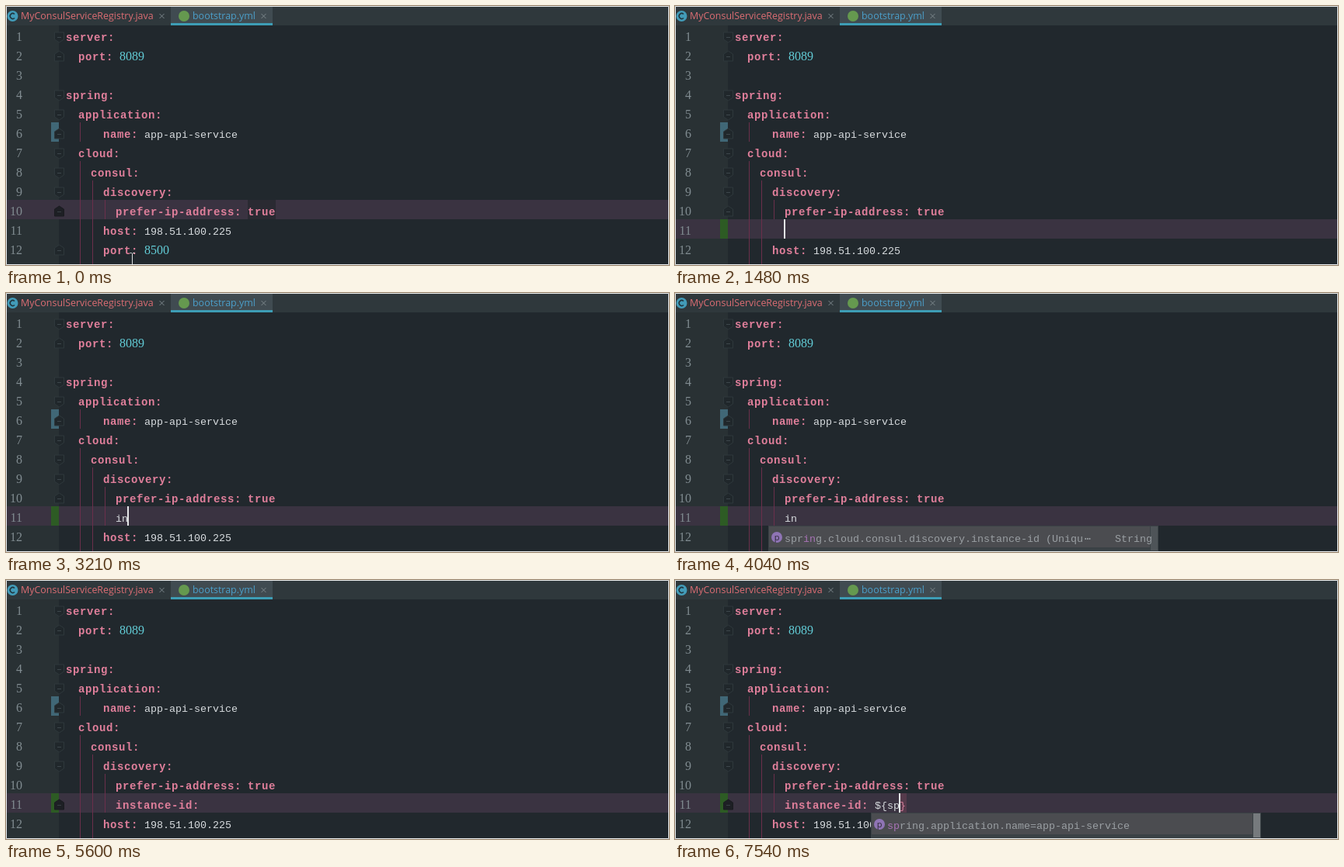
Write an HTML page that moves like this. It is 853 by 334 pixels and loops after 8000 ms.

```html
<!DOCTYPE html>
<html lang="en">
<head>
<meta charset="utf-8">
<title>Editing bootstrap.yml</title>
<style>
  html, body { margin: 0; width: 100%; height: 100%; overflow: hidden; background: #21282d; }
  svg { display: block; width: 100vw; height: 100vh; }
  text { white-space: pre; font: 13.33px "Liberation Mono", "DejaVu Sans Mono", monospace; }
  .key { font-size: 14px; font-weight: bold; letter-spacing: .6px; fill: #e07f9b; }
  .num, .line { font: 16px "Liberation Serif", "Noto Serif", serif; }
  .num { fill: #62ccd6; }
  .val { fill: #d8dcdf; }
  .brace { fill: #d77f9c; }
  .line { fill: #818c91; text-anchor: end; }
  .tab { font: 12.45px "Open Sans", "Noto Sans", sans-serif; }
  .hint { fill: #9a9fa3; }
  .match { fill: #a873b6; }
</style>
</head>
<body>
<svg id="stage" viewBox="0 0 853 334" preserveAspectRatio="none"></svg>
<script>
const LOOP = 8000, ROW = 25, LEFT = 77;
const BOLD = 9, CHAR = 8;
const stage = document.getElementById('stage');

const rect = (x, y, w, h, fill, extra = '') =>
  `<rect x="${x}" y="${y}" width="${w}" height="${h}" fill="${fill}" ${extra}/>`;
const text = (x, y, cls, s, extra = '') =>
  `<text x="${x}" y="${y}" class="${cls}" ${extra}>${s}</text>`;
const path = (d, stroke, width = 1, fill = 'none') =>
  `<path d="${d}" stroke="${stroke}" stroke-width="${width}" fill="${fill}"/>`;
const base = n => n * ROW + 20;
const guide = (x, y, h) => rect(x, y, 1, h, '#6b2f4b');

// One "key: value" line, indented by a number of spaces.
function entry(n, indent, key, value = '', cls = 'val') {
  const x = LEFT + indent * CHAR;
  const after = x + (key.length + 1) * BOLD + CHAR;
  return text(x, base(n), 'key', key + ':') + (value ? text(after, base(n), cls, value) : '');
}

// Fold marker: a small house, pointing down at a block start, up at its end.
function fold(n, dir, active) {
  const y = n * ROW + 15, s = dir;
  const d = `M62.5 ${y - 6 * s}H74.5V${y + 3 * s}L68.5 ${y + 7 * s}L62.5 ${y + 3 * s}Z`;
  return path(d, active ? '#1a1b20' : '#2f383c', 1, active ? '#1d1f24' : '#20272b') +
    path(`M66 ${y + .5}H71`, active ? '#383f44' : '#3d474c');
}

function cross(x) {
  return path(`M${x - 3} 10l6 6m0 -6l-6 6`, '#7b868b');
}

function tabs() {
  return rect(0, 0, 853, 25, '#2f383c') +
    rect(212, 1, 131, 24, '#404b51') +
    rect(212, 22, 131, 3, '#3d9db5') +
    '<circle cx="8.500" cy="13" r="7" fill="#429bb8"/>' +
    path('M11 10.500A3.400 3.400 0 1 0 11 15.500', '#20343d', 1.5) +
    text(19, 17, 'tab', 'MyConsulServiceRegistry.java', 'fill="#dc6d73"') + cross(200.5) +
    '<circle cx="229" cy="13" r="7" fill="#65994f"/>' +
    text(240, 17, 'tab', 'bootstrap.yml', 'fill="#4b9fca"') + cross(331.5);
}

function typed(t) {
  if (t < 3110) return '';
  if (t < 3210) return 'i';
  if (t < 4440) return 'in';
  if (t < 6060) return '';
  if (t < 6460) return '$';
  if (t < 7380) return '${';
  return t < 7460 ? '${s' : '${sp';
}

const within = (t, ...spans) => spans.some(([a, b]) => t >= a && t < b);

function caretOn(t) {
  return within(t, [780, 2560], [3110, 4040], [4440, 5600], [6060, 6910], [7380, LOOP]);
}

// Completion list; its scroll thumb fades soon after it opens.
function popup(x, right, age, content) {
  const alpha = age < 150 ? .3 : age < 250 ? .2 : .1;
  return rect(x, 300, right - x, 34, '#3a4145') +
    rect(x + 1, 301, right - x - 12, 27, '#4b4c50') +
    rect(right - 10, 301, 9, 31, '#fff', `opacity="${alpha}"`) +
    `<circle cx="${x + 11}" cy="315" r="7" fill="#8f74b5"/>` +
    text(x + 11, 319, 'tab', 'p', 'fill="#2c2833" style="font-size:11px" text-anchor="middle"') +
    text(x + 21, 321, 'hint', content);
}

const mark = s => `<tspan class="match">${s}</tspan>`;

function hints(t) {
  if (within(t, [3280, 4440]))
    return popup(120, 622, t - 3280, `spr${mark('in')}g.cloud.consul.discovery.instance-id (Uniqu`) +
      text(527, 321, 'hint', '⋯') + text(566, 321, 'hint', 'String');
  if (t >= 7540)
    return popup(252, 754, 0, `${mark('sp')}ring.application.name=app-api-service`);
  return '';
}

// The pointer glides to the end of line 10 in short steps.
function pointer(t) {
  if (t >= 1480) return '';
  const step = t < 70 ? 0 : Math.min(9, 1 + Math.floor((t - 70) / 88.75));
  const p = step / 9, e = p * p * (3 - 2 * p);
  const x = Math.round(162 + 220 * e) + .5, y = Math.round(326 - 63 * e);
  return path(`M${x - 3} ${y - 7.5}h2l1 1l1 -1h2M${x} ${y - 7}V${y + 7}` +
    `M${x - 3} ${y + 7.5}h2l1 -1l1 1h2`, '#d9dcdd');
}

function draw(t) {
  const inserted = t >= 1480, keyed = t >= 4440, folded = t >= 4740;
  const row = inserted ? 11 : 10;
  const host = row + 1;
  const input = typed(t);
  let s = rect(0, 0, 853, 334, '#21282d') + rect(0, 25, 68, 309, '#293134') + tabs();

  s += rect(1, row * ROW, 851, ROW, '#3a3341');
  if (!inserted) s += rect(311, 250, 36, ROW, '#2a2a32');
  s += rect(58, 150, 10, ROW, '#406776');
  if (inserted) s += rect(58, 275, 10, ROW, '#2d5b24');

  for (let n = 1; n <= 12; n++) s += text(21, base(n), 'line', n);
  for (const n of [1, 4, 5, 7, 8, 9]) s += fold(n, 1);
  s += fold(2, -1) + fold(6, -1);
  if (!folded) s += fold(10, -1, !inserted);
  else s += fold(11, -1, true);
  if (!inserted) s += fold(12, -1);

  s += guide(95, 150, 25) + guide(95, 200, 133) + guide(111, 225, 108);
  if (!keyed || folded) s += guide(127, 250, t < 1800 ? 25 : 50);

  s += entry(1, 0, 'server') + entry(2, 2, 'port', '8089', 'num') +
    entry(4, 0, 'spring') + entry(5, 2, 'application') +
    entry(6, 6, 'name', 'app-api-service') +
    entry(7, 2, 'cloud') + entry(8, 4, 'consul') + entry(9, 6, 'discovery') +
    entry(10, 8, 'prefer-ip-address', 'true', 'key') +
    entry(host, 6, 'host', '198.51.100.225');
  if (!inserted) s += entry(12, 6, 'port', '8500', 'num');

  const start = keyed ? 257 : 141;
  const caret = inserted ? start + input.length * CHAR : 347;
  if (keyed) s += entry(11, 8, 'instance-id');
  s += text(start, base(11), 'val', input);
  if (t >= 6780) s += rect(caret, 275, BOLD, ROW, '#553a4b');
  if (t >= 6460) s += text(caret, base(11), t < 6780 ? 'val' : 'brace', '}');
  if (caretOn(t)) s += rect(caret - 1, row * ROW, 2, ROW, '#e3e5e6');

  s += hints(t) + pointer(t);
  return s + path('M.5 .5H852.500V333.500H.5Z', '#eceeef');
}

let shown = '';
function frame(now) {
  const next = draw(now % LOOP);
  if (next !== shown) stage.innerHTML = shown = next;
  requestAnimationFrame(frame);
}
frame(0);
</script>
</body>
</html>
```
